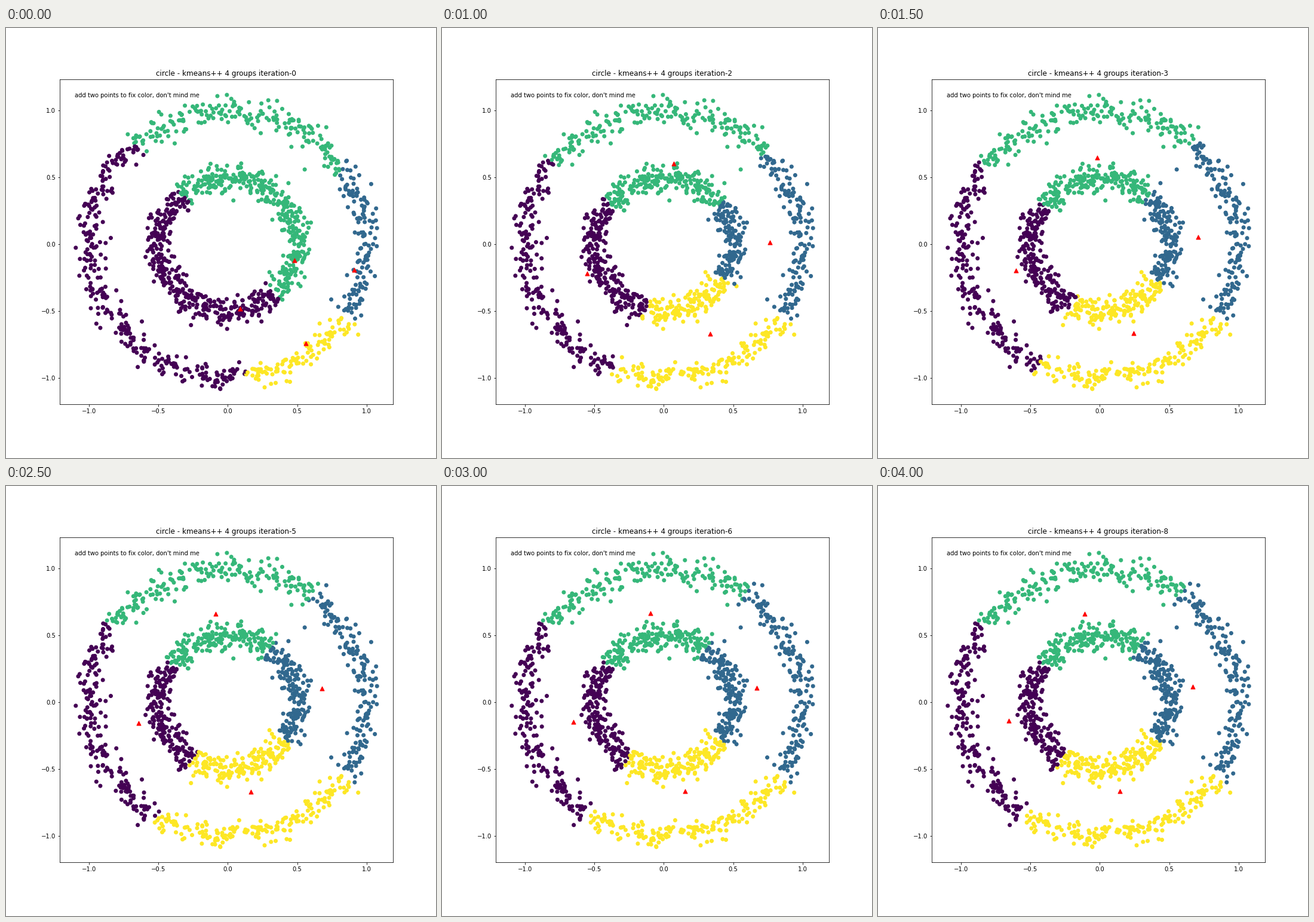
A matplotlib script for the animation above (4500 ms loop, 720 by 720 pixels).

```python
import numpy as np
import matplotlib.pyplot as plt
from matplotlib.animation import FuncAnimation

plt.rcParams["font.family"] = "DejaVu Sans"

STEPS = 9
SAMPLES = 1500
FACTOR = 0.5   # inner radius over outer radius
NOISE = 0.05

# Starting centres: purple, blue, green, yellow.
START = np.array([(0.090, -0.480), (0.908, -0.194),
                  (0.481, -0.122), (0.560, -0.743)])


def noisy_circles(rng):
    angle = np.linspace(0, 2 * np.pi, SAMPLES // 2, endpoint=False)
    outer = np.column_stack([np.cos(angle), np.sin(angle)])
    circles = np.vstack([outer, outer * FACTOR])
    order = np.arange(SAMPLES)
    rng.shuffle(order)
    return circles[order] + rng.normal(scale=NOISE, size=circles.shape)


def nearest(points, centres):
    gaps = points[:, None, :] - centres[None, :, :]
    return (gaps ** 2).sum(axis=2).argmin(axis=1)


def kmeans(points, centres, steps):
    """Return the centres and the labels of every iteration."""
    history = []
    for _ in range(steps):
        labels = nearest(points, centres)
        history.append((centres, labels))
        centres = np.array([points[labels == k].mean(axis=0)
                            for k in range(len(centres))])
    return history


points = noisy_circles(np.random.RandomState(0))
history = kmeans(points, START, STEPS)

fig = plt.figure(figsize=(10, 10), dpi=72, facecolor="white")
ax = fig.add_axes([0.125, 0.125, 0.775, 0.755])
ax.set_xlim(-1.2103, 1.1897)
ax.set_ylim(-1.1964, 1.2304)
ax.set_xticks(np.arange(-1, 1.1, 0.5))
ax.set_yticks(np.arange(-1, 1.1, 0.5))

dots = ax.scatter(*points.T, c=history[0][1], cmap="viridis", vmin=0, vmax=3)
marks = ax.scatter(*START.T, s=50, c="red", marker="^", zorder=3)
ax.text(-1.103, 1.1, "add two points to fix color, don't mind me")
title = ax.set_title("", x=0.4985)


def draw(step):
    centres, labels = history[step]
    dots.set_array(labels)
    marks.set_offsets(centres)
    title.set_text(f"circle - kmeans++ 4 groups iteration-{step}")
    return dots, marks, title


anim = FuncAnimation(fig, draw, frames=STEPS, interval=500,
                     repeat=True, repeat_delay=0, blit=False)
plt.show()
```
